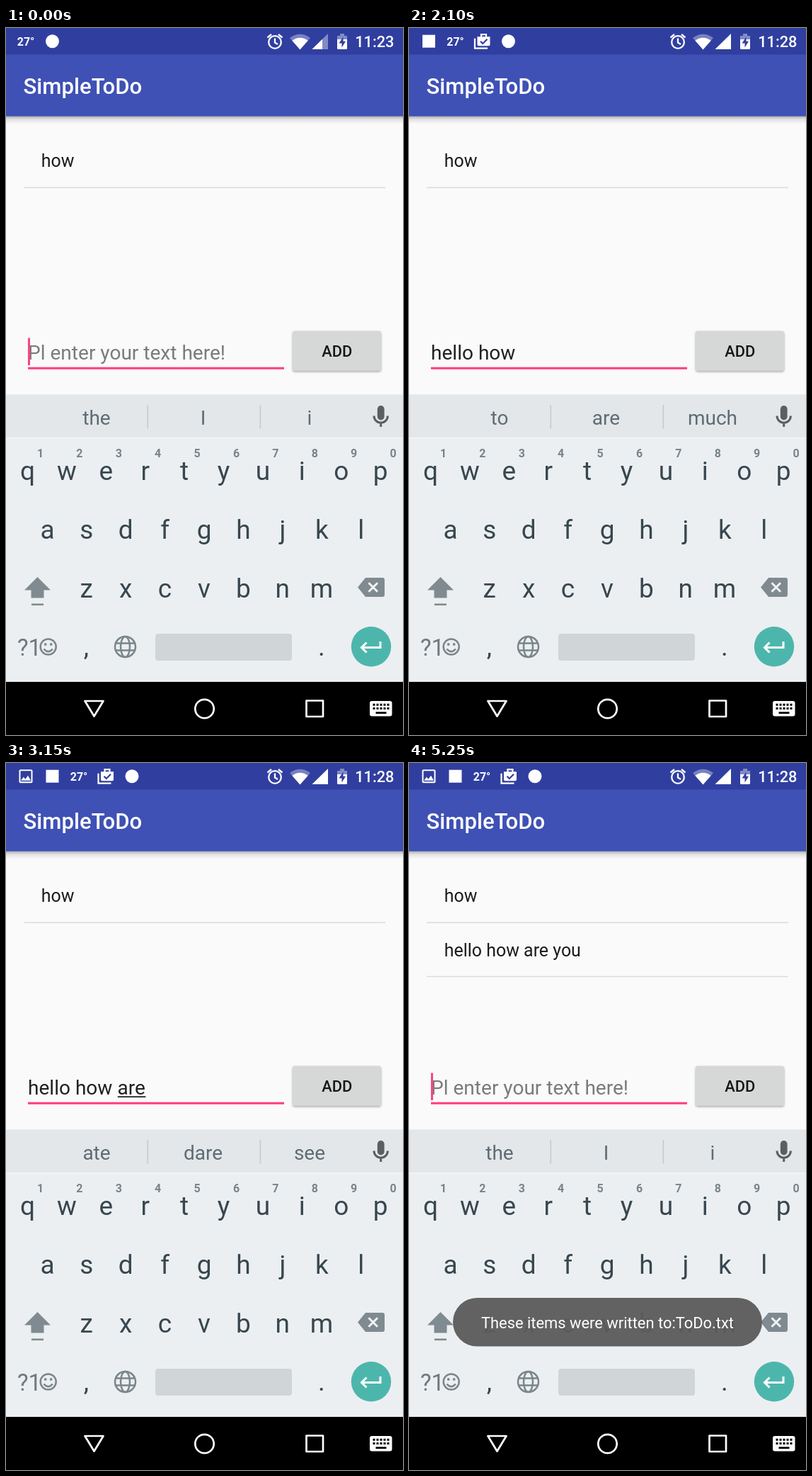
These frames come from a looping animation (561 px wide and 998 px high, 6300 ms). An HTML page:

```html
<!DOCTYPE html>
<html lang="en">
<head>
<meta charset="utf-8">
<title>SimpleToDo</title>
<style>
  html, body { margin: 0; width: 100%; height: 100%; overflow: hidden; background: #fafafa; }
  svg { display: block; width: 100%; height: 100%; font-family: Roboto, sans-serif; }
  .mid { text-anchor: middle; }
  .medium { font-weight: 500; }
  .input { font-size: 28.05px; fill: #212121; }
  .item { font-size: 24.93px; fill: #1b1b1b; }
  .word { font-size: 28px; fill: #5f6c73; text-anchor: middle; }
  .key { font-size: 37px; fill: #37474f; text-anchor: middle; }
  .hint { font-size: 16px; font-weight: 700; fill: #78838a; text-anchor: middle; }
  .line { fill: none; stroke-width: 3; }
  .scene { visibility: hidden; animation: show 6300ms step-end infinite; }
  @keyframes show {
    0% { visibility: visible; }
    16.6666%, 100% { visibility: hidden; }
  }
</style>
</head>
<body>
<svg viewBox="0 0 561 998" preserveAspectRatio="none">
  <defs>
    <linearGradient id="shade" x2="0" y2="1">
      <stop offset="0" stop-color="#000" stop-opacity=".3"/>
      <stop offset=".4" stop-color="#000" stop-opacity=".1"/>
      <stop offset="1" stop-color="#000" stop-opacity="0"/>
    </linearGradient>
    <filter id="lift" x="-10%" y="-10%" width="120%" height="130%">
      <feDropShadow dx="0" dy="1.8" stdDeviation="1.4" flood-opacity=".35"/>
    </filter>
    <g id="picture">
      <path d="M-7.5-9.500H7.500Q9.500-9.500 9.500-7.500V7.500Q9.500 9.500 7.500 9.500H-7.500Q-9.500 9.500-9.500 7.500V-7.500Q-9.500-9.500-7.500-9.500Z" fill="#fff"/>
      <path d="M-7.500-7.500H7.500V7.500H-7.500Z" fill="#303f9f"/>
      <path d="M-7 6L-3.200 1-.6 4 3-1 7 6Z" fill="#fff"/>
    </g>
    <rect id="mail" x="-9" y="-9" width="18" height="18" fill="#fff"/>
    <circle id="head" r="9.500" fill="#fff"/>
    <g id="bag" fill="none" stroke="#fff" stroke-width="2.200">
      <path d="M-10-4V10H8"/>
      <path d="M-1-6V-9.500H6V-6"/>
      <path d="M-6.500-6.500H11.500V4.500Q11.500 6.500 9.500 6.500H-4.500Q-6.500 6.500-6.500 4.500Z" fill="#fff" stroke="none"/>
      <path d="M-2 0L1.300 3.300 7.500-3" stroke="#303f9f"/>
    </g>
  </defs>

  <rect width="561" height="998" fill="#fafafa"/>
  <rect y="124.500" width="561" height="11" fill="url(#shade)"/>
  <rect y="37" width="561" height="87.700" fill="#3f51b5"/>
  <rect width="561" height="37.500" fill="#303f9f"/>
  <text class="medium" x="24.500" y="93" font-size="31.170" fill="#fff">SimpleToDo</text>

  <!-- status icons -->
  <g fill="#fff">
    <g class="line" stroke="#fff" style="stroke-width:2.300">
      <circle cx="380" cy="20" r="8.800"/>
      <path d="M380 14.500V20.500L384 23M369.500 13.500L375 9M390.500 13.500L385 9"/>
    </g>
    <path d="M401 14Q415.500 3.500 430 14L415.500 30.500Z" opacity=".35"/>
    <path d="M404.300 17.800Q415.500 9.500 426.700 17.800L415.500 30.500Z"/>
    <path d="M468 16V11H472V8H478V11H482V16Z" opacity=".4"/>
    <path d="M468 16H482V28.500Q482 30 480.500 30H469.500Q468 30 468 28.500Z"/>
    <path d="M476.500 12.500L470.500 21.500H474.500V27.500L480 18.800H476.500Z" fill="#303f9f"/>
  </g>

  <rect x="25" y="224.500" width="511" height="1.600" fill="#dcdcdc"/>
  <text class="item" x="49.800" y="196">how</text>
  <rect x="31" y="478.700" width="362" height="3.100" fill="#ff4081"/>
  <rect x="405" y="427.500" width="125" height="56" rx="3" fill="#d6d7d7" filter="url(#lift)"/>
  <text class="mid medium" x="467.700" y="463.500" font-size="21.820" fill="#151515">ADD</text>

  <!-- keyboard -->
  <rect y="517.500" width="561" height="406" fill="#eceff1"/>
  <rect y="517.500" width="561" height="61" fill="#e3e7ea"/>
  <rect y="578" width="561" height="1.500" fill="#f3f5f6"/>
  <path d="M200.300 532V565.500M359.300 532V565.500" stroke="#c5cbce" stroke-width="1.600"/>
  <rect x="524.800" y="533" width="9.800" height="20.500" rx="4.900" fill="#5b5f61"/>
  <path class="line" d="M520 547.500A9.700 9.700 0 0 0 539.400 547.500M529.700 557V563" stroke="#5b5f61"/>
  <g id="keys"></g>
  <g fill="#7f8b90">
    <path d="M44.500 775L63 793.500H53.500V804.500H35.500V793.500H26Z"/>
    <rect x="36" y="812.500" width="17" height="2.600"/>
    <path d="M508 776H532Q535 776 535 779V800Q535 803 532 803H508L497 789.500Z"/>
    <path class="line" d="M512.500 783.200L525 795.700M525 783.200L512.500 795.700" stroke="#f1f3f4"/>
    <text x="16" y="885.500" font-size="33" fill="#6e7a80">?1</text>
    <g class="line" stroke="#7a868b" style="stroke-width:2.500">
      <circle cx="59.700" cy="873.500" r="11"/>
      <path d="M53.500 876.500Q59.700 884 65.900 876.500"/>
      <circle cx="168.500" cy="873.500" r="14.500"/>
      <ellipse cx="168.500" cy="873.500" rx="6.500" ry="14.500"/>
      <path d="M155 868.500H182M155 878.500H182"/>
    </g>
    <circle cx="55.700" cy="870" r="1.900"/>
    <circle cx="63.700" cy="870" r="1.900"/>
  </g>
  <rect x="211" y="855" width="193" height="38" rx="4" fill="#d0d5d8"/>
  <circle cx="516" cy="873.300" r="28.200" fill="#4db6ac"/>
  <path class="line" d="M529 866V874.500H503M509.500 867.500L502.500 874.500 509.500 881.500" stroke="#fff"/>

  <!-- navigation bar -->
  <rect y="923" width="561" height="75"/>
  <g class="line" stroke="#fff" stroke-linejoin="round" style="stroke-width:2.700">
    <path d="M111.500 950H137.500L124.500 971.500Z"/>
    <circle cx="280.500" cy="961" r="13.200"/>
    <rect x="424.500" y="949.500" width="23.500" height="22.500"/>
  </g>
  <rect x="514" y="950" width="31.500" height="21.500" rx="3" fill="#fff"/>
  <path d="M518.500 955.300H541.500M518.500 960.500H541.500" stroke="#000" stroke-width="3" stroke-dasharray="3 2"/>
  <path d="M522.500 966.700H537.500" stroke="#000" stroke-width="2.700"/>

  <g id="scenes"></g>
</svg>
<script>
  const byId = id => document.getElementById(id);
  const text = (kind, x, y, value) => `<text class="${kind}" x="${x}" y="${y}">${value}</text>`;
  const bar = (x, y, w, h, fill) => `<rect x="${x}" y="${y}" width="${w}" height="${h}" fill="${fill}"/>`;
  const row = (kind, chars, x, y) =>
    [...chars].map((c, i) => text(kind, x + 55.4 * i, y, c)).join('');

  byId('keys').innerHTML =
    row('key', 'qwertyuiop', 30.5, 637.5) +
    row('hint', '1234567890', 48.5, 606) +
    row('key', 'asdfghjkl', 58.5, 720.5) +
    row('key', 'zxcvbnm', 113.7, 803.5) +
    text('key', 113.5, 885.5, ',') + text('key', 446, 885.5, '.');

  const tray = names => names.map((name, i) => {
    const x = 28 + 37.5 * i;
    return name === 'temp'
      ? `<text class="mid" x="${x}" y="24.5" font-size="16" font-weight="700" fill="#fff">27°</text>`
      : `<use href="#${name}" x="${x}" y="18.700"/>`;
  }).join('');

  const signal = full =>
    `<path d="M455 8V30H432.500Z" fill="#fff" opacity="${full ? 1 : .4}"/>` +
    (full ? '' : '<path d="M447 15.800V30H432.500Z" fill="#fff"/>');

  const few = ['temp', 'head'];
  const more = ['mail', 'temp', 'bag', 'head'];
  const most = ['picture', ...more];

  const placeholder = 'Pl enter your text here!';
  const scenes = [
    { time: '11:23', icons: few, words: ['the', 'I', 'i'], caret: 31 },
    { time: '11:26', icons: more, words: ['help', 'bello', 'jello'], typed: 'hello', mark: [31, 60], caret: 91 },
    { time: '11:28', icons: more, words: ['to', 'are', 'much'], typed: 'hello how' },
    { time: '11:28', icons: most, words: ['ate', 'dare', 'see'], typed: 'hello how are', mark: [157.8, 39.6] },
    { time: '11:28', icons: most, words: ['your', 'You', 'young'], typed: 'hello how are you', mark: [204.2, 44.5], caret: 248.7 },
    { time: '11:28', icons: most, words: ['the', 'I', 'i'], caret: 31, saved: true }
  ];

  const savedItem =
    text('item', 49.8, 272.5, 'hello how are you') +
    bar(25, 300.7, 511, 1.6, '#dcdcdc') +
    '<rect x="62" y="755" width="437" height="68.500" rx="34.200" fill="#5b5b5b" opacity=".95"/>' +
    '<text class="mid" x="280.500" y="797.500" font-size="21.900" fill="#fff">These items were written to:ToDo.txt</text>';

  byId('scenes').innerHTML = scenes.map((s, i) => `
    <g class="scene" style="animation-delay:${(i - scenes.length) * 1050}ms">
      ${tray(s.icons)}${signal(i > 0)}
      <text class="medium" x="548.500" y="27" font-size="21.820" fill="#fff" text-anchor="end">${s.time}</text>
      ${s.words.map((w, k) => text('word', 128 + 150.5 * k, 559.5, w)).join('')}
      ${s.typed ? text('input', 31, 467.5, s.typed)
                : `<text class="input" x="31" y="467.500" style="fill:#7b7b7b">${placeholder}</text>`}
      ${s.mark ? bar(s.mark[0], 470.3, s.mark[1], 1.8, '#212121') : ''}
      ${s.caret ? bar(s.caret, 437.5, 3, 38.5, '#ff4081') : ''}
      ${s.saved ? savedItem : ''}
    </g>`).join('');
</script>
</body>
</html>
```
